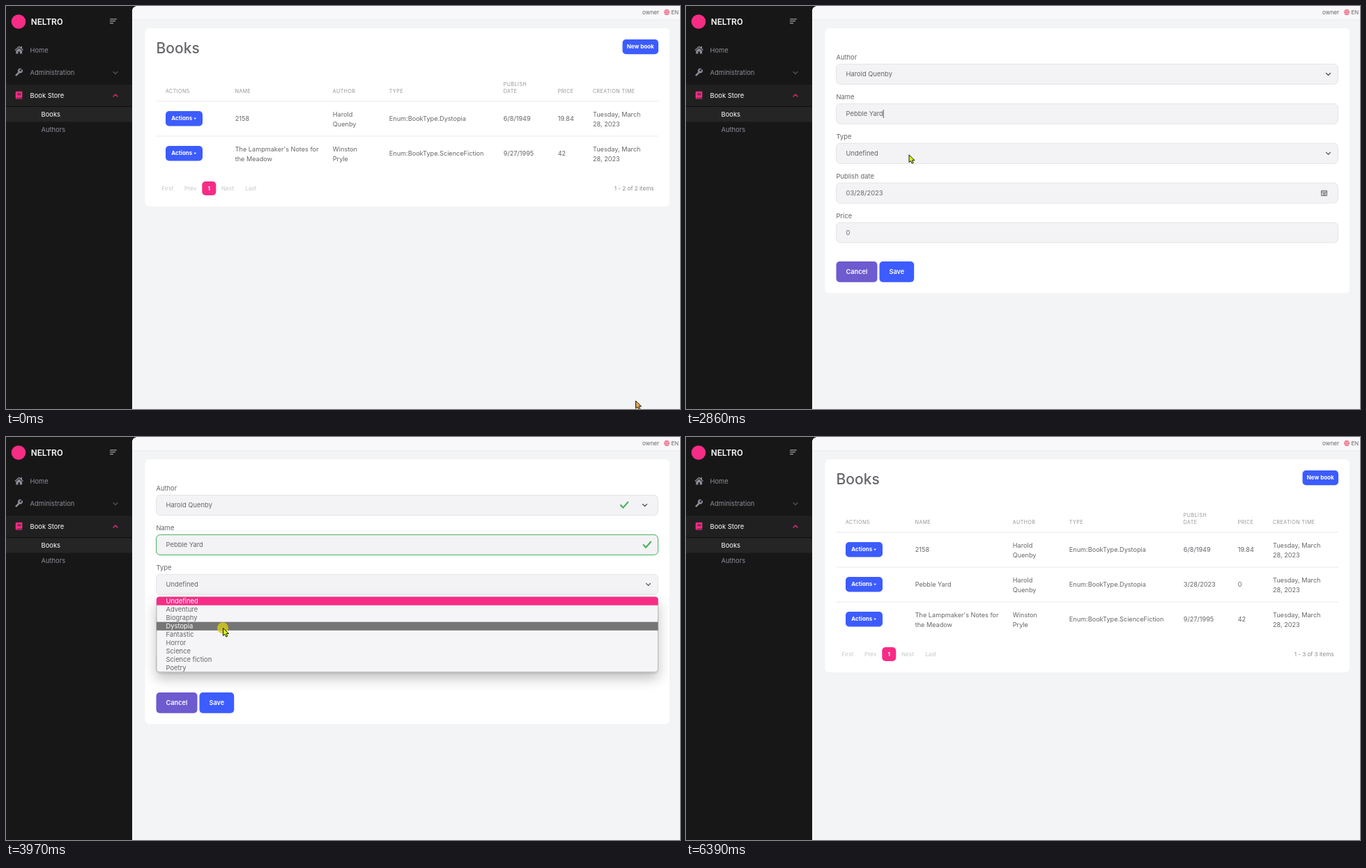
Write an HTML page that moves like this. It is 967 px wide and 579 px high and loops after 6.92 s.

```html
<!DOCTYPE html>
<html lang="en">
<head>
<meta charset="utf-8">
<title>Book list</title>
<style>
  html, body { margin: 0; width: 100%; height: 100%; overflow: hidden; background: #f3f4f6; }
  svg { display: block; width: 967px; height: 579px; }
  text { font-family: Inter, sans-serif; font-size: 9.4px; fill: #66666b; white-space: pre; }
  .cell { font-size: 9.15px; }
  .head { font-size: 7px; letter-spacing: .5px; fill: #929297; }
  .title { font-size: 21px; font-weight: 500; }
  .nav { fill: #8d8d99; }
  .on, .small, .big { fill: #fff; }
  .small { font-size: 8px; font-weight: 700; text-anchor: middle; }
  .big { font-size: 9.2px; font-weight: 600; text-anchor: middle; }
  .pager { font-size: 8.1px; fill: #c6c6cc; }
  .count { font-size: 8.1px; fill: #88888d; text-anchor: end; }
  .top { font-size: 8.2px; }
  .brand { font: 500 12.6px Roboto, sans-serif; fill: #fff; }
  .line { fill: none; stroke-width: 1.2; stroke-linecap: round; stroke-linejoin: round; }
  .field { fill: #f3f3f5; stroke: #e5e5e9; }
  .valid { stroke: #4bb15f; }
  .menu { filter: drop-shadow(0 9px 9px rgba(0, 0, 0, .24)); }
</style>
</head>
<body>
<svg id="stage" viewBox="0 0 967 579"></svg>
<script>
const LOOP = 6920;
const BLUE = '#3d5cff', PINK = '#f72c85', GREEN = '#4bb15f';
const BOOK = 'Pebble Yard', AUTHOR = ['Harold', 'Quenby'];
const TYPES = ['Undefined', 'Adventure', 'Biography', 'Dystopia', 'Fantastic',
  'Horror', 'Science', 'Science fiction', 'Poetry'];

const label = (x, y, str, cls = '', id = '') => `<text x="${x}" y="${y}" class="${cls}" id="${id}">${str}</text>`;
const box = (x, y, w, h, fill, r = 0, extra = '') =>
  `<rect x="${x}" y="${y}" width="${w}" height="${h}" rx="${r}" fill="${fill}" ${extra}/>`;
const shape = (d, fill, extra = '') => `<path d="${d}" fill="${fill}" ${extra}/>`;
const line = (d, color, extra = '') => `<path d="${d}" class="line" stroke="${color}" ${extra}/>`;
const group = (id, body, extra = '') => `<g id="${id}" ${extra}>${body}</g>`;
const chevron = (x, y, color = '#4a4a4f', up = 1) => line(`M${x - 3} ${y - 1.5 * up}l3 ${3 * up}l3 ${-3 * up}`, color);
const check = (x, y) => line(`M${x - 5} ${y + .5}l3.3 3.6l7 -8`, GREEN, 'style="stroke-width:2.2"');

function sidebar() {
  return box(0, 0, 190, 579, '#171717') + box(0, 113, 181, 31.5, '#202020') +
    box(0, 144, 181, 1, '#0c0c0c') + box(0, 145, 181, 21.5, '#252525') +
    `<circle cx="18" cy="22.5" r="10.3" fill="${PINK}"/>` +
    label(35.8, 27.3, 'NELTRO', 'brand') +
    line('M149.5 18.8h9M149.5 21.7h7M149.5 24.6h4', '#a0a0a8') +
    shape('M12.5 63l6.2 -5.4 2.3 2v-1.6h2v3.3l2 1.7-.8 .9-5.5-4.7-5.4 4.7zM14.3 64.2l4.4-3.8 4.4 3.8v4.2h-3.2v-3.2h-2.4v3.2h-3.2z', '#8d8d99') +
    line('M14.7 99.3l5.2 -5.2', '#8d8d99', 'style="stroke-width:2.6"') +
    line('M23 92.2a2.6 2.6 0 1 1 -2.2 -1.8', '#8d8d99', 'style="stroke-width:2"') +
    shape('M15 122.8h8.3v8.2h-.8v1.6h.8v1h-8a1.6 1.6 0 0 1-1.6-1.6v-7.6a1.6 1.6 0 0 1 1.3-1.6z', PINK) +
    line('M16.7 125.7h4.5M16.7 127.6h4.5M16 132.1h5.8', '#202020', 'style="stroke-width:.8"') +
    label(34.5, 66.6, 'Home', 'nav') + label(34.5, 99.3, 'Administration', 'nav') +
    label(34.5, 131.8, 'Book Store', 'on') + label(50.5, 159.2, 'Books', 'on') +
    label(50.5, 181.2, 'Authors', 'nav') +
    chevron(157, 96, '#55555c') + chevron(157, 128.5, PINK, -1);
}

function topbar() {
  return shape('M967 0H188Q181 1 181 8V579H967z', '#f3f4f6') +
    shape('M967 0H188Q181 1 181 8V19.5H967z', '#f8f8fa') + box(181, 19.5, 786, .8, '#e9eaee') +
    label(913, 12, 'owner', 'top') + label(954.2, 12, 'EN', 'top') +
    '<circle cx="948" cy="9" r="4.2" fill="#ee7f96"/>' +
    line('M944.6 7.6h6.8M944.6 10.4h6.8', '#f7ccd5', 'style="stroke-width:.7"');
}

const card = height => box(199.5, 32, 752.5, height, '#fff', 6);

function row([name, author, type, date, price], i) {
  const y = 165 + i * 50;
  const lines = (x, parts) => parts.map((p, k) =>
    label(x, y + (parts.length > 1 ? k * 14 - 6.5 : 0), p, 'cell')).join('');
  return box(216, y - 28.5, 720, 1, '#e9e9ec') + box(229, y - 14, 53, 21.5, BLUE, 5) +
    label(252.3, y - .6, 'Actions', 'small') + shape(`M269.2 ${y - 4.2}h4l-2 2.2z`, '#fff') +
    lines(328.7, name) + lines(468.8, author) + lines(549.8, ['Enum:BookType.' + type]) +
    lines(713.8, [date]) + lines(791.7, [price]) + lines(842, ['Tuesday, March', '28, 2023']);
}

function list(id, books) {
  const n = books.length, y = 165 + n * 50;
  const heads = [[229, 'ACTIONS'], [328.7, 'NAME'], [468.8, 'AUTHOR'], [549.8, 'TYPE'],
    [713.8, 'DATE'], [791.7, 'PRICE'], [842, 'CREATION TIME']];
  const pages = [[223.2, 'First'], [256, 'Prev'], [309, 'Next'], [343.2, 'Last']];
  return group(id, card(156 + n * 50) + label(215.5, 68, 'Books', 'title') +
    box(884.5, 48, 51.5, 21.3, BLUE, 5) + label(910.2, 61.3, 'New book', 'small') +
    label(713.8, 114.6, 'PUBLISH', 'head') +
    heads.map(([x, s]) => label(x, 125.2, s, 'head')).join('') + books.map(row).join('') +
    pages.map(([x, s]) => label(x, y, s, 'pager')).join('') +
    box(281.3, y - 13, 20, 20, PINK, 5) + label(291.3, y, '1', 'small') +
    label(929.5, y, `1 - ${n} of ${n} items`, 'count'));
}

function form() {
  const fields = ['Author', 'Name', 'Type', 'Publish date', 'Price'].map((s, i) => {
    const y = 83.5 + i * 56.9;
    return label(215.5, y - 6.2, s) + box(215.5, y, 720, 29, '', 6, 'class="field"');
  }).join('');
  return group('form', card(380.5) + fields +
    label(229.5, 101.4, AUTHOR.join(' ')) + label(229.5, 158.4, '', '', 'name') +
    label(229.5, 215.2, TYPES[0], '', 'type') + label(229.5, 272.3, '03/28/2023') + label(229.5, 329.3, '0') +
    group('caret', box(0, 149, .8, 12, '#333')) +
    group('plain', chevron(921.5, 98)) +
    group('checked', box(215.5, 140.4, 720, 29, 'none', 6, 'class="valid"') +
      chevron(916.5, 98) + check(887, 97.5) + check(919.7, 154.6)) +
    chevron(921.5, 211.8) +
    line('M912 265.3h7.4v7.2h-7.4zM912 267.3h7.4M913.7 269.2h4M913.7 270.8h4', '#55555a', 'style="stroke-width:.9"') +
    box(215.5, 367, 59, 29.7, '#6d5bcf', 5) + label(245, 385.3, 'Cancel', 'big') +
    box(277.5, 367, 49.7, 29.7, BLUE, 5) + label(302.3, 385.3, 'Save', 'big'));
}

function menu() {
  return group('menu',
    box(216, 229.7, 719.5, 108, '#f5f5f7', 4, 'stroke="#a9a9ad" stroke-width=".8" class="menu"') +
    shape('M216 241.7V233.7a4 4 0 0 1 4-4H931.5a4 4 0 0 1 4 4V241.7z', PINK) +
    box(216, 0, 719.5, 12.2, '#757575', 0, 'id="hover"') +
    TYPES.map((s, i) => label(229.5, 239.2 + i * 12, s, 'option')).join(''));
}

const cursor = group('cursor',
  '<circle id="click" r="8" fill="#d6cb18" fill-opacity=".82"/>' +
  shape('M.5 .3V11.2L3 9 4.8 12.8 6.8 11.9 5.1 8.2H8.6z', '#d3f31a', 'id="arrow" stroke="#1c1c10" stroke-width="1" stroke-linejoin="round"') +
  shape('M-1 1Q0 -.6 1 1V5L2 4.4 3 5.2 4.3 4.8 5 5.7 6.3 5.5Q7.3 6 7 8.2L5.8 11V13H.3V11.4L-2.8 8Q-3.3 6.2-1 7.3z', '#d3f31a', 'id="hand" stroke="#1c1c10" stroke-width="1" stroke-linejoin="round"'));

const first = [['2158'], AUTHOR, 'Dystopia', '6/8/1949', '19.84'];
const added = [[BOOK], AUTHOR, 'Dystopia', '3/28/2023', '0'];
const last = [["The Lampmaker's Notes for", 'the Meadow'], ['Winston', 'Pryle'], 'ScienceFiction', '9/27/1995', '42'];

const stage = document.getElementById('stage');
stage.innerHTML = sidebar() + topbar() + list('before', [first, last]) +
  list('after', [first, added, last]) + form() + menu() + cursor;

const el = id => document.getElementById(id);
const show = (id, on) => el(id).setAttribute('visibility', on ? 'visible' : 'hidden');
const within = (t, a, b) => t >= a && t < b;

// Each move: first step, last step, step count, end point, optional curve control point.
const START = [903, 567];
const MOVES = [
  [70, 740, 11, [908, 78], [570, 390]],
  [800, 800, 1, [909.5, 63]],
  [1470, 1470, 1, [910, 61]],
  [1660, 2330, 11, [407, 144], [680, 98]],
  [2530, 2860, 6, [319.5, 213.5]],
  [3100, 3290, 4, [318, 264]],
  [3360, 3360, 1, [316.7, 274.5]],
  [3430, 3560, 3, [315, 285]],
  [3630, 3770, 3, [311, 274.3]],
  [4110, 4650, 8, [302, 381]],
  [5920, 6390, 8, [903, 582], [690, 420]]
];

function cursorAt(t) {
  let from = START;
  for (const [a, b, n, to, ctrl] of MOVES) {
    if (t < a) break;
    const step = n === 1 ? 1 : Math.min(n, Math.floor((t - a) / (b - a) * (n - 1) + 1e-6) + 1);
    const p = step / n, e = p * p * (3 - 2 * p);
    const mid = ctrl || from.map((v, i) => (v + to[i]) / 2);
    from = from.map((v, i) => (1 - e) ** 2 * v + 2 * e * (1 - e) * mid[i] + e * e * to[i]);
  }
  return from;
}

function draw(t) {
  const [x, y] = cursorAt(t);
  const inForm = within(t, 1470, 5060), open = within(t, 3060, 4110), checked = t >= 2930;
  show('before', t < 1470);
  show('after', t >= 5060);
  show('form', inForm);
  show('plain', inForm && !checked);
  show('checked', inForm && checked);
  show('caret', within(t, 2330, 2930));
  el('name').textContent = t >= 2530 ? BOOK : '';
  el('type').textContent = t >= 4110 ? 'Dystopia' : TYPES[0];
  el('caret').setAttribute('transform', `translate(${229.5 + el('name').getComputedTextLength()})`);

  const hovered = Math.floor((y - 229.7) / 12);
  show('menu', open);
  show('hover', open && hovered > 0);
  el('hover').setAttribute('y', 229.7 + Math.max(0, hovered) * 12);
  stage.querySelectorAll('.option').forEach((option, i) =>
    option.style.fill = i === 0 || i === hovered ? '#fff' : '');

  const hand = within(t, 800, 1470) || within(t, 4580, 5060);
  show('arrow', !hand);
  show('hand', hand);
  show('click', [1270, 2390, 2930, 3970, 4790].some(c => within(t, c, c + 135)));
  el('arrow').setAttribute('fill', t < 70 ? '#e3a552' : '#d3f31a');
  el('cursor').setAttribute('transform', `translate(${x} ${y})`);
}

let start;
function tick(now) {
  start ??= now;
  draw((now - start) % LOOP);
  requestAnimationFrame(tick);
}
draw(0);
requestAnimationFrame(tick);
</script>
</body>
</html>
```
